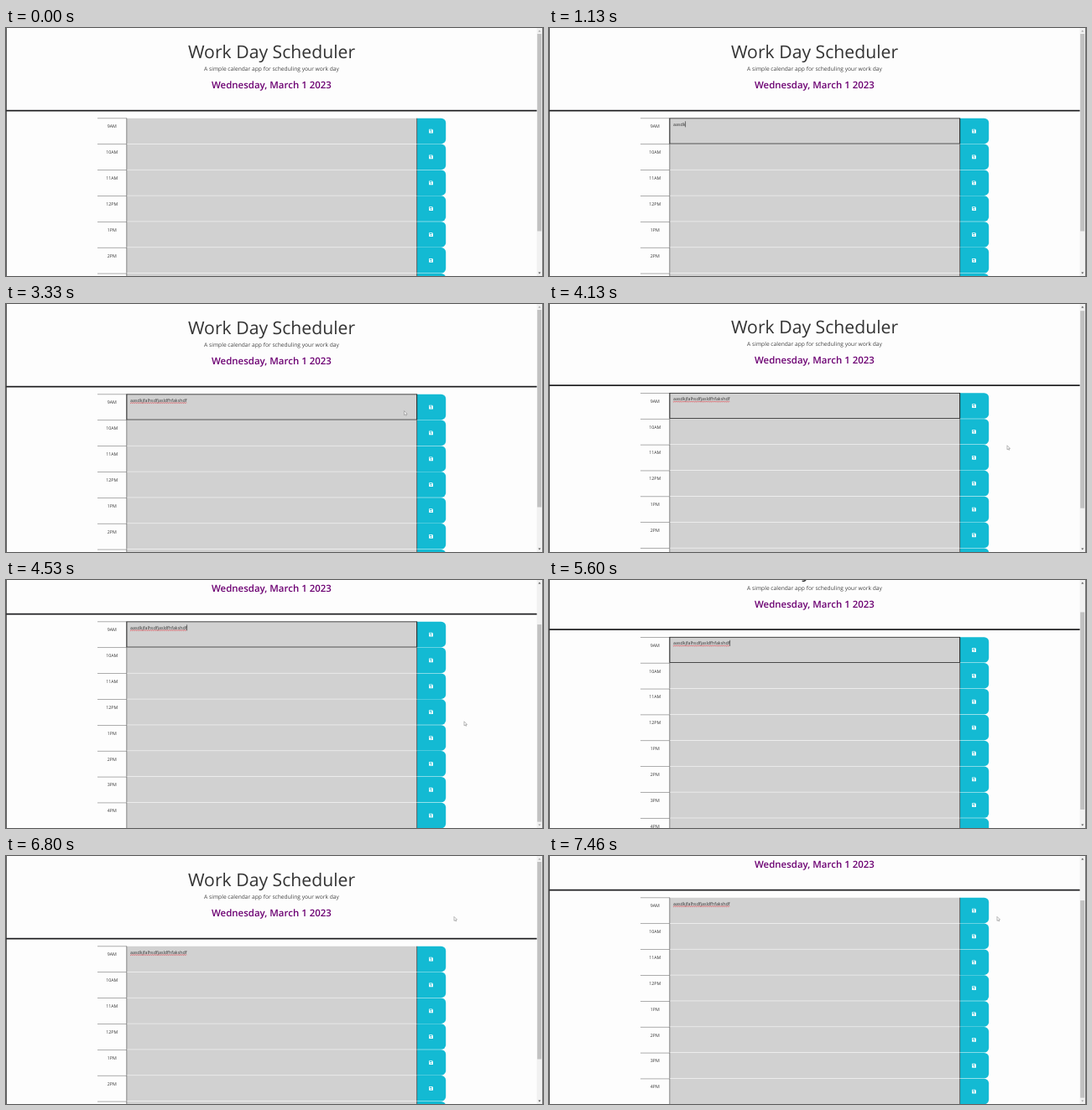
An HTML page with a canvas that plays this animation: 640 by 296 pixels, repeating every 8000 ms.

```html
<!DOCTYPE html>
<html lang="en">
<head>
<meta charset="utf-8">
<title>Work Day Scheduler</title>
<style>
html, body { margin: 0; width: 100%; height: 100%; overflow: hidden; background: #fdfdfd; }
canvas { display: block; width: 640px; height: 296px; }
</style>
</head>
<body>
<canvas id="stage"></canvas>
<script>
const W = 640, H = 296, LOOP = 8000, TICK = 200 / 3;
const NOTE = 'aasdkjfalhsdfjasldfhfakshdf';
const ROWS = 9, ROW_TOP = 107.75, ROW_STEP = 30.87;
const SCROLL_MAX = 58;
const TEAL = '#13bad3', INK = '#333';
const FONT = '"Open Sans", "Noto Sans", sans-serif';

const canvas = document.getElementById('stage');
const dpr = window.devicePixelRatio || 1;
canvas.width = W * dpr;
canvas.height = H * dpr;
const ctx = canvas.getContext('2d');
ctx.scale(dpr, dpr);
if ('textRendering' in ctx) ctx.textRendering = 'geometricPrecision';

// 0 to 1 between two times; a higher bend gives softer ends
function glide(t, start, end, bend = 2) {
  const p = Math.min(1, Math.max(0, (t - start) / (end - start)));
  const a = p ** bend, b = (1 - p) ** bend;
  return a / (a + b);
}

const mix = (a, b, p) => a + (b - a) * p;

function scrollAt(t) {
  return SCROLL_MAX * (glide(t, 4090, 4400) - glide(t, 5467, 5866, 1.1) + glide(t, 7200, 7466));
}

// slow first keys, then one per tick, then a faster finish
function typedAt(t) {
  const count = Math.max((t - 200) / 333.3, (t - 800) / TICK, (t - 1181) / 47.6, 0);
  return NOTE.slice(0, Math.floor(count + 0.02));
}

function rect(x, y, w, h, color) {
  ctx.fillStyle = color;
  ctx.fillRect(x, y, w, h);
}

function text(str, x, y, size, color, align = 'center', weight = 400) {
  ctx.font = `${weight} ${size}px ${FONT}`;
  ctx.textAlign = align;
  ctx.fillStyle = color;
  ctx.fillText(str, x, y);
}

function shape(points, fill, stroke) {
  ctx.beginPath();
  points.forEach(([x, y]) => ctx.lineTo(x, y));
  ctx.closePath();
  ctx.fillStyle = fill;
  ctx.fill();
  if (stroke) {
    ctx.strokeStyle = stroke;
    ctx.lineWidth = 0.5;
    ctx.stroke();
  }
}

function saveIcon(x, y) {
  shape([[x, y], [x + 3.8, y], [x + 4.8, y + 1], [x + 4.8, y + 4.8], [x, y + 4.8]], '#fff');
  rect(x + 0.8, y + 0.8, 2.5, 1.1, TEAL);
  ctx.beginPath();
  ctx.arc(x + 2.4, y + 3.3, 0.7, 0, Math.PI * 2);
  ctx.fill();
}

function drawHeader() {
  text('Work Day Scheduler', 316.5, 36.2, 21.2, INK);
  text('A simple calendar app for scheduling your work day', 316.5, 51.2, 6.68, '#444');
  text('Wednesday, March 1 2023', 316.4, 72.2, 11.47, '#6c0072', 'center', 600);
  rect(0, 97.8, 633, 1.7, '#1c1c1e');
}

function drawRow(i) {
  const y = ROW_TOP + i * ROW_STEP;
  const label = (i + 8) % 12 + 1 + (i < 3 ? 'AM' : 'PM');
  rect(109, y - 0.2, 35, 0.6, '#777');
  text(label, 126.3, y + 11.5, 5.3, INK);
  rect(144, y, 346, 30.3, '#d1d1d1');
  rect(143.5, y, 0.7, 30.6, '#555');
  ctx.beginPath();
  ctx.roundRect(490, y, 34.2, 30.4, [0, 5.5, 5.5, 0]);
  ctx.fillStyle = TEAL;
  ctx.fill();
  rect(489.4, y, 0.7, 30.5, '#333');
  saveIcon(504.2, y + 12.9);
}

function drawNote(t) {
  const typed = typedAt(t);
  const y = ROW_TOP + 9.1;
  text(typed, 148, y, 5.3, INK, 'left');
  const end = 148 + ctx.measureText(typed).width;

  if (t >= 3200) {
    ctx.beginPath();
    for (let x = 148; x <= end; x += 0.25) ctx.lineTo(x, y + 1.2 + 0.4 * Math.sin(x * 2.8));
    ctx.strokeStyle = '#e0303a';
    ctx.lineWidth = 0.65;
    ctx.stroke();
  }
  const focused = t >= 260 && t < 6730;
  if (!focused) return;
  ctx.strokeStyle = '#222';
  ctx.lineWidth = 0.8;
  ctx.strokeRect(143.9, ROW_TOP + 0.1, 345.8, 30.2);
  const caret = t < 2928 || Math.floor((t - 2928) / 533) % 2 === 1;
  if (caret) rect(end, y - 5.5, 0.6, 7, '#222');
}

function drawScrollbar(scroll) {
  rect(632.6, 0, 6.6, H, '#f1f1f1');
  rect(633.2, 7 + scroll * 0.795, 5, 235.5, '#c1c1c1');
  shape([[634.3, 4.4], [635.8, 2.6], [637.3, 4.4]], scroll > 0 ? '#555' : '#a3a3a3');
  shape([[634.3, 291.6], [635.8, 293.4], [637.3, 291.6]], scroll < SCROLL_MAX ? '#555' : '#a3a3a3');
  rect(0, 0, 0.8, H, '#333');
  rect(639.3, 0, 0.7, H, '#444');
}

function arrow(x, y) {
  ctx.save();
  ctx.translate(x, y);
  shape([[0, 0], [0, 5], [1.2, 4], [2, 5.6], [2.8, 5.2], [2.1, 3.7], [3.6, 3.6]], '#fff', '#777');
  ctx.restore();
}

function drawPointer(t) {
  if (t >= 3200 && t < 5500) {
    const p = glide(t, 3200, 3860);
    arrow(mix(470, 546, p), mix(125, 168.8, p));
  } else if (t >= 6400) {
    const p = glide(t, 6400, 6795);
    arrow(mix(500, 534, p), mix(150, 72.4, p));
  }
}

function draw(t) {
  const scroll = scrollAt(t);
  rect(0, 0, W, H, '#fdfdfd');
  ctx.save();
  ctx.translate(0, -scroll);
  drawHeader();
  for (let i = 0; i < ROWS; i++) drawRow(i);
  drawNote(t);
  ctx.restore();
  drawScrollbar(scroll);
  drawPointer(t);
}

function frame() {
  const t = performance.now() % LOOP;
  // the screen refreshes fifteen times a second
  draw(Math.floor((t + 8) / TICK) * TICK);
  requestAnimationFrame(frame);
}
frame();
</script>
</body>
</html>
```
